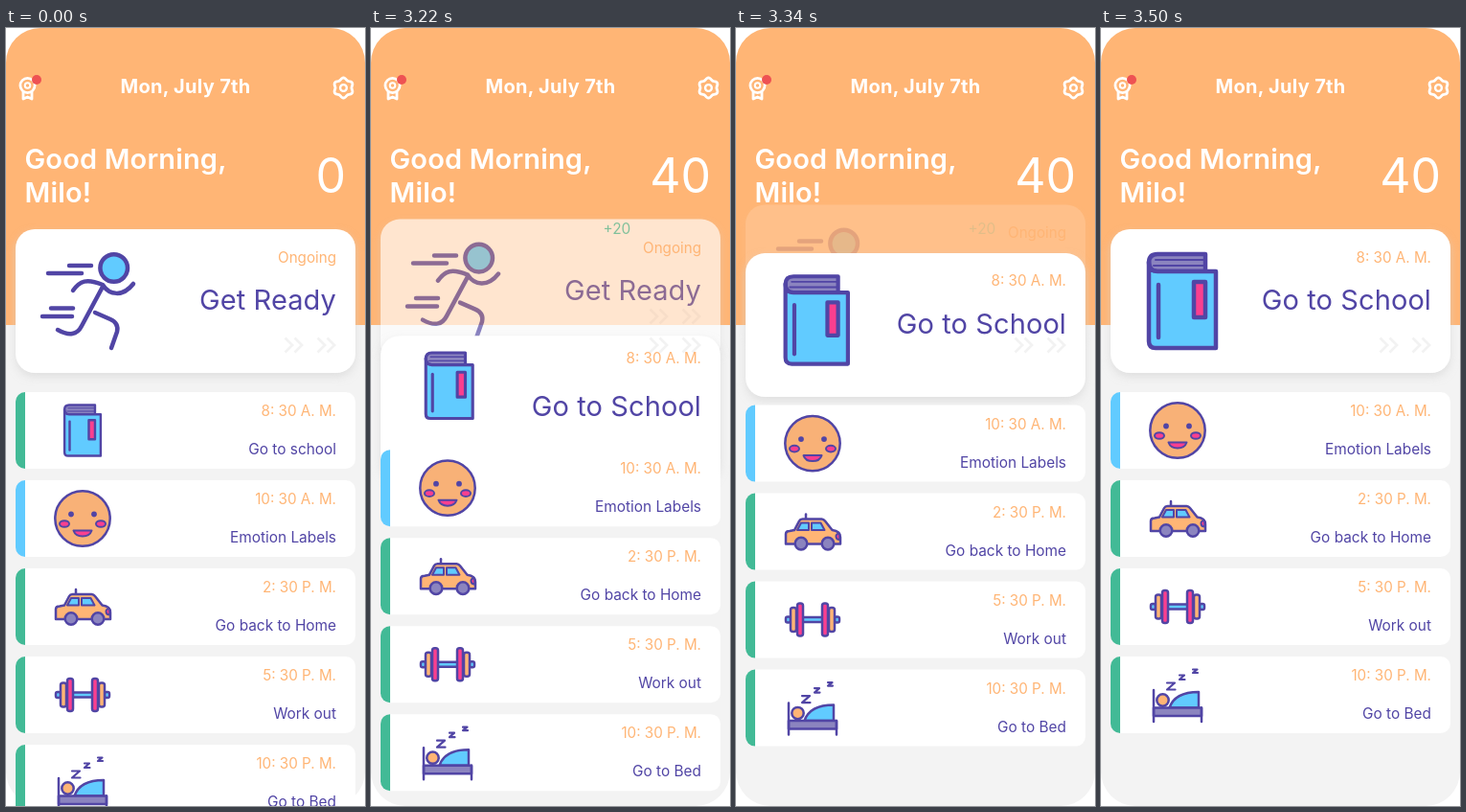
Recreate the animation shown at these times as an HTML page. Size 375x812 px, loop 6840 ms.

```html
<!DOCTYPE html>
<html lang="en">
<head>
<meta charset="utf-8">
<title>Daily schedule</title>
<style>
html, body { margin: 0; width: 100%; height: 100%; overflow: hidden; background: #fff; }
svg { display: block; width: 375px; height: 812px; }
text { font: 15.4px Inter, sans-serif; fill: #5145a5; }
.right { text-anchor: end; }
.time { fill: #ffb575; font-size: 15.2px; }
.title { font-size: 29px; letter-spacing: .1px; }
.hello { font-size: 29px; font-weight: 600; fill: #fff; letter-spacing: .15px; }
.date { font-size: 20px; font-weight: 700; fill: #fff; text-anchor: middle; letter-spacing: .3px; }
.score { font-size: 50px; fill: #fff; }
.plus { fill: #3fae80; }
.big { fill: #fff; filter: drop-shadow(0 4px 4px rgba(210, 210, 210, .6)); }
.icon { stroke: #5145a5; stroke-width: 2.5; fill: none; stroke-linecap: round; stroke-linejoin: round; }
.white { stroke: #fff; stroke-width: 2.8; fill: none; stroke-linejoin: round; }
.chevrons { stroke: rgba(0, 0, 0, .05); stroke-width: 2.8; fill: none; }
.o { fill: #ffb575; } .b { fill: #61cbff; } .p { fill: #fa3f8f; } .g { fill: #8b84bf; } .ink { fill: #5145a5; stroke: none; }
.skin { fill: #f8b177; }
</style>
</head>
<body>
<svg viewBox="0 0 375 812">
  <defs>
    <path id="chev" d="M291.500 323.500l7.500 7.500-7.500 7.500m10-15l7.500 7.500-7.500 7.500m24-15l7.500 7.500-7.500 7.500m10-15l7.500 7.500-7.500 7.500"/>
    <g id="book" stroke-width="4.500">
      <path class="g" d="M-26-31Q-35-31-35-40T-26-49H24V-31z"/>
      <path d="M-28-43H24M-30-37H24" stroke-width="2"/>
      <path class="b" d="M-35-41Q-35-31-26-31H35V49H-28Q-35 49-35 42z"/>
      <path class="p" d="M12-20H24V17H12z"/>
      <path d="M-25-17V38"/>
    </g>
    <g id="face">
      <circle class="skin" cx="80" cy="40" r="28.700"/>
      <circle class="ink" cx="68" cy="35.500" r="2.900"/>
      <circle class="ink" cx="92" cy="35.500" r="2.900"/>
      <g class="p" stroke-width="2">
        <ellipse cx="61" cy="45.500" rx="5" ry="3.300"/>
        <ellipse cx="99" cy="45.500" rx="5" ry="3.300"/>
        <path d="M70.500 52.500H89.500Q87.500 58.500 80 58.500T70.500 52.500z"/>
      </g>
    </g>
    <g id="car">
      <path d="M73 22V27"/>
      <path class="o" d="M52 53V42.500Q52 39.500 56 39.500L61 38.500 66 29Q67 27 69.500 27H89.500Q91.500 27 93 29L100.500 38.500Q109 39.500 109 46V53z"/>
      <path class="b" stroke-width="2" d="M64 38.500L68 31H76V38.500zM79 38.500V31H88.500L92.500 38.500z"/>
      <path class="p" stroke-width="2" d="M108 42Q104 42.500 104.500 45.500T108.500 48.500z"/>
      <circle class="g" cx="68" cy="52.500" r="6.300"/>
      <circle class="g" cx="96" cy="52.500" r="6.300"/>
    </g>
    <g id="dumbbell">
      <rect class="b" x="69" y="37.500" width="22" height="5"/>
      <g id="plates">
        <rect class="b" x="52" y="37" width="5" height="6" rx="2"/>
        <rect class="o" x="57" y="27.500" width="6" height="25" rx="2.500"/>
        <rect class="p" x="64" y="23" width="6" height="34" rx="2.500"/>
      </g>
      <use href="#plates" transform="matrix(-1 0 0 1 160 0)"/>
    </g>
    <g id="bed">
      <circle class="o" cx="64.500" cy="45.500" r="6.200"/>
      <path class="b" d="M71.500 53.500Q77 37 102 37V53.500z"/>
      <path class="g" d="M55 53.500H105V62H55z"/>
      <path d="M55 35V68M105 53.500V68"/>
      <path stroke-width="2.200" d="M69 27.500H77L69 34.500H77.500M82 19.500H87L82 24H87.500M96 13.500H100.500L96 17H101"/>
    </g>
  </defs>

  <rect width="375" height="812" rx="36" fill="#f3f3f3"/>
  <path fill="#ffb575" d="M0 310V36A36 36 0 0 1 36 0H339A36 36 0 0 1 375 36V310z"/>
  <text class="date" x="187.500" y="68">Mon, July 7th</text>
  <text class="hello" x="19.500" y="147">Good Morning,</text>
  <text class="hello" x="19.500" y="182">Milo!</text>
  <text class="score right" id="score" x="355" y="172"></text>
  <g class="white">
    <circle cx="22.500" cy="60" r="7.600"/>
    <circle cx="22.500" cy="60" r="2.800" stroke-width="2"/>
    <path d="M18 66.500V74L22.500 72 27 74V66.500"/>
    <circle cx="32" cy="54" r="5" fill="#ee5253" stroke="none"/>
    <path id="gear"/>
    <circle cx="352.500" cy="62.500" r="3.400" stroke-width="2.400"/>
  </g>

  <g id="old">
    <rect class="big" x="10" y="210" width="355" height="150" rx="20"/>
    <g class="icon" style="stroke-width:4.500">
      <circle class="b" cx="112.700" cy="250.500" r="14.300"/>
      <path d="M66 248H89M44 256H79M47 292.500H70M38 301H69"/>
      <path d="M70 274C77 264 84 261 101 268C108 279 122 281 133 267"/>
      <path d="M101 270L79 311Q72 325 54 315"/>
      <path d="M93 297L109 304Q118 308 116 317L110 334"/>
    </g>
    <text class="time right" x="345" y="245">Ongoing</text>
    <text class="title right" x="345" y="294">Get Ready</text>
  </g>
  <g id="fade">
    <text class="plus" x="242.500" y="215">+20</text>
    <use class="chevrons" href="#chev" y="-30"/>
  </g>

  <g id="next">
    <g id="small"></g>
    <g id="large">
      <rect class="big" x="10" width="355" height="150" rx="20"/>
      <text class="title right" x="345" y="84">Go to School</text>
    </g>
    <use class="icon" id="cover" href="#book"/>
    <text class="time right" id="hour" x="345">8: 30 A. M.</text>
  </g>
  <g id="rows"></g>
  <use class="chevrons" href="#chev"/>
</svg>
<script>
const LOOP = 6840, SWITCH = 3160, START = 3140, DURATION = 360, STEP = 20;
const $ = id => document.getElementById(id);
const GREEN = '#42ba96', BLUE = '#61cbff';

const card = (color, label) => `
  <path fill="${color}" d="M20 0a10 10 0 0 0-10 10v60a10 10 0 0 0 10 10z"/>
  <path fill="#fff" d="M20 0H355a10 10 0 0 1 10 10v60a10 10 0 0 1-10 10H20z"/>
  <text class="right" x="345" y="65">${label}</text>`;

$('small').innerHTML = card(GREEN, 'Go to school');
$('rows').innerHTML = [
  ['face', BLUE, '10: 30 A. M.', 'Emotion Labels'],
  ['car', GREEN, '2: 30 P. M.', 'Go back to Home'],
  ['dumbbell', GREEN, '5: 30 P. M.', 'Work out'],
  ['bed', GREEN, '10: 30 P. M.', 'Go to Bed']
].map(([icon, color, time, label], i) => `
  <g transform="translate(0 ${472 + 92 * i})">${card(color, label)}
    <use class="icon" href="#${icon}"/>
    <text class="time right" x="345" y="25">${time}</text>
  </g>`).join('');

// Six-toothed gear as a wavy circle
$('gear').setAttribute('d', 'M' + Array.from({ length: 72 }, (_, i) => {
  const a = i * Math.PI / 36, r = 9.5 + Math.cos(6 * a);
  return [352.5 + r * Math.sin(a), 62.5 - r * Math.cos(a)].map(v => v.toFixed(2)).join(' ');
}).join('L') + 'z');

// cubic-bezier(.25, .1, .25, 1)
function ease(x) {
  let lo = 0, hi = 1, s;
  for (let i = 0; i < 24; i++) {
    s = (lo + hi) / 2;
    if (.75 * s * (1 - s) + s ** 3 < x) lo = s; else hi = s;
  }
  return .3 * s * (1 - s) ** 2 + 3 * s * s * (1 - s) + s ** 3;
}

const show = (id, on) => { $(id).style.display = on ? '' : 'none'; };
const move = (id, y) => $(id).setAttribute('transform', `translate(0 ${y})`);

function draw(ms) {
  const t = Math.floor(ms % LOOP / STEP) * STEP;
  const on = t >= SWITCH;
  const p = on ? ease(Math.min(1, (t - START) / DURATION)) : 0;

  $('score').textContent = on ? '40' : '0';
  show('small', !on);
  show('large', on);
  show('fade', on);
  $('old').style.opacity = $('fade').style.opacity = 1 - p;
  move('old', -30 * p);
  move('next', 380 - 170 * p);
  move('rows', -92 * p);
  $('hour').setAttribute('y', 25 + 10 * p);
  $('cover').setAttribute('transform',
    `translate(${80 + 5 * p} ${40 + 35 * p}) scale(${.54 + .46 * p})`);
}

const begin = performance.now();
function tick() {
  draw(performance.now() - begin);
  requestAnimationFrame(tick);
}
tick();
</script>
</body>
</html>
```
